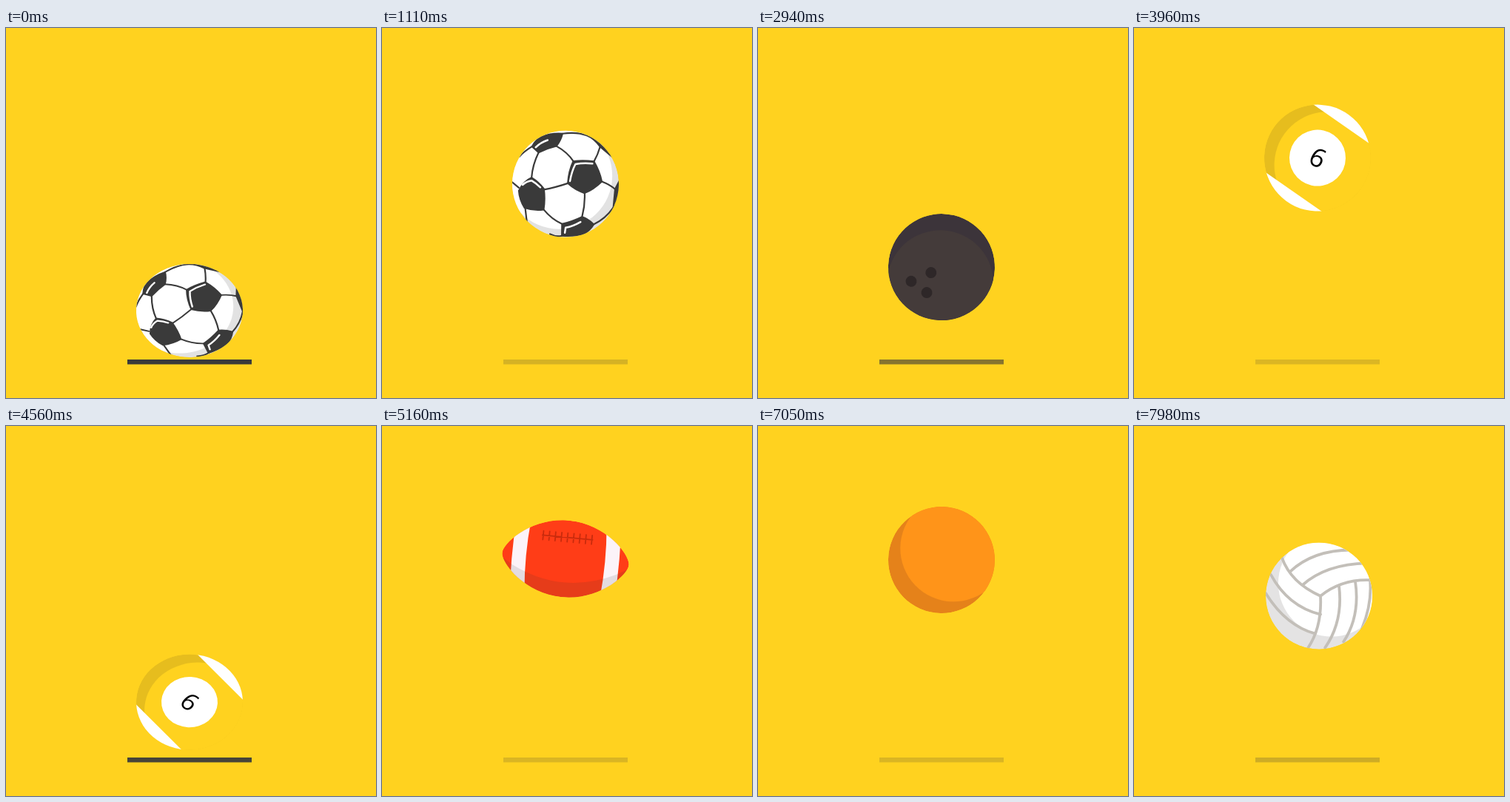
These frames come from a looping animation (500x500 px, 8 s). An HTML page:

```html
<!DOCTYPE html>
<html lang="en">
<head>
<meta charset="utf-8">
<title>Bouncing balls</title>
<style>
  html, body { margin: 0; width: 100%; height: 100%; overflow: hidden; background: #ffd21f; }
  svg { display: block; width: 100vw; height: 100vh; }
  text { font: 500 35px "Open Sans", Inter, sans-serif; text-anchor: middle; }
</style>
</head>
<body>
<svg viewBox="0 0 500 500">
  <defs><clipPath id="round"><circle r="72"/></clipPath></defs>
  <rect id="floor" x="164" y="448" width="168" height="6.5" fill="#3a3a3a"/>
  <g id="stage"></g>
</svg>
<script>
const LOOP = 8000, PERIOD = 1523, APEX = 770, HALF = 761;
const TOP = 167.8, DROP = 214.2;

// A disc with a crescent of shade; (dx, dy) moves the lit part.
const disc = (shade, lit, dx, dy) =>
  `<circle r="72" fill="${shade}"/><circle cx="${dx}" cy="${dy}" r="72" fill="${lit}"/>`;
const round = art => `<g clip-path="url(#round)">${art}</g>`;
const stroke = (d, color, width) =>
  `<path d="${d}" fill="none" stroke="${color}" stroke-width="${width}" stroke-linecap="round" stroke-linejoin="round"/>`;

const soccer = round(
  disc('#e2e2e2', '#fff', -9, -11) +
  `<path fill="#3a3a3a" stroke="#3a3a3a" stroke-width="2" stroke-linejoin="round" d="
    M10-31Q24-33 38-31Q46-18 49-4Q38 7 26 12Q13 8 3-1Q4-18 10-31Z
    M-46-50Q-41-60-33-64Q-19-69-5-68Q-7-59-13-51Q-25-48-37-42Z
    M-46-8Q-36-2-29 7Q-27 22-29 35Q-42 37-55 33Q-62 22-63 10Q-57-3-46-8Z
    M-4 54Q9 51 23 44Q32 47 39 54Q34 63 24 68Q10 71-4 70Z
    M67 6L74-8V22L65 31Z M28-66Q38-62 46-51L62-38 50-64Z"/>` +
  stroke(`M-13-51Q2-43 10-31 M38-31Q43-40 46-51 M-37-42Q-45-25-46-8 M-29 8Q-14 5 3-1
    M-29 35Q-18 48-4 54 M-54 33L-51 56 M26 12Q27 28 23 44 M49-4Q60 0 67 6
    M65 31Q55 46 39 54 M-63 6L-74-3 M-5-68Q14-71 28-66 M-46-50Q-57-43-63-36
    M-20 68Q-12 72-4 70`, '#3a3a3a', 2.2) +
  stroke('M6-4Q8-17 13-27Q24-29 36-28 M-58 2Q-53-3-46-4Q-39 0-34 5 M-41-49Q-34-56-25-59 M0 66L1 59Q11 57 21 51', '#fff', 2.5));

const bowling = round(
  disc('#3c343a', '#443b3a', 18, 13) +
  [[-1, 16], [19, 35], [-5, 45]].map(([x, y]) =>
    `<circle cx="${x}" cy="${y}" r="7.5" fill="#2e2728"/>`).join(''));

const pool = round(
  disc('#e6bd1e', '#ffd21f', 14, 9) +
  `<g transform="rotate(32.5)">
    <path fill="#fff" d="M-80-56H80V-80H-80ZM-80 56H80V80H-80Z"/>
    <circle r="38" fill="#fff"/><text y="12" transform="rotate(-8)">6</text></g>`);

const ovalPath = 'M-86 0C-86-14-50-52 0-52S86-14 86 0 50 52 0 52-86 14-86 0Z';
const laces = Array.from({ length: 9 }, (_, i) => `M${-33 + i * 8.25}-35v12`).join('');
const football = `<clipPath id="oval"><path d="${ovalPath}"/></clipPath>
  <g transform="rotate(5.3)"><g clip-path="url(#oval)">
    <path d="${ovalPath}" fill="#ff3d17"/>
    <path fill="#fcf3f8" d="M-70-60Q-75 0-70 60H-50Q-57 0-50-60ZM70-60Q75 0 70 60H50Q57 0 50-60Z"/>
    <path d="M-90 3L-70 15Q0 49 70 15L90 3V60H-90Z" fill="#333" opacity=".12"/>
    ${stroke(laces + 'M-34-29H34', '#c92b0d', 1.8)}
  </g></g>`;

const orange = round(disc('#e5821a', '#ff9419', 16, -16));

const volley = `<g transform="translate(2 1.5)">${round(
  disc('#e4e3e3', '#fff', 17, -17) +
  stroke(`M2 0Q-38-18-50-52 M2 0Q4 42-15 70 M2 0Q32-24 73-21
    M-22-15Q10-43 65-44 M-39-33Q-8-62 44-62
    M27-14Q33 34 8 70 M49-20Q56 27 33 62 M69-22Q72 10 58 44
    M2 25Q-42 14-65-29 M-5 51Q-45 40-72-4`, '#c3bfb9', 3.8))}</g>`;

// Spin in degrees over one bounce.
function spin(p) {
  const a = 2 * Math.PI * (p - 0.32);
  return 34 - 38 * Math.cos(a) + 9 * Math.cos(2 * a);
}

// Each ball is drawn as it lies at the given point of its bounce.
const balls = [[soccer, .726], [bowling, .217], [pool, .592], [football, .376], [orange, .626], [volley, .232]];
const stage = document.getElementById('stage');
const floor = document.getElementById('floor');
stage.innerHTML = balls.map(([art]) => `<g>${art}</g>`).join('');
const groups = [...stage.children];

function draw(time) {
  const t = time % LOOP;
  const index = Math.floor(t / PERIOD);
  const local = t - index * PERIOD;
  const fall = Math.min(1, Math.abs(local - APEX) / HALF);
  const k = fall * fall;
  const contact = Math.max(0, 1 - (1 - fall) * HALF / 90);
  const angle = spin(local / PERIOD) - spin(balls[index][1]);
  groups.forEach((g, i) => g.setAttribute('display', i === index ? 'inline' : 'none'));
  groups[index].setAttribute('transform',
    `translate(248 ${TOP + DROP * k}) scale(1 ${1 - 0.125 * contact}) rotate(${angle})`);
  floor.setAttribute('opacity', 0.18 + 0.82 * k * k);
}

const start = performance.now();
function tick() {
  draw(performance.now() - start);
  requestAnimationFrame(tick);
}
draw(0);
requestAnimationFrame(tick);
</script>
</body>
</html>
```
